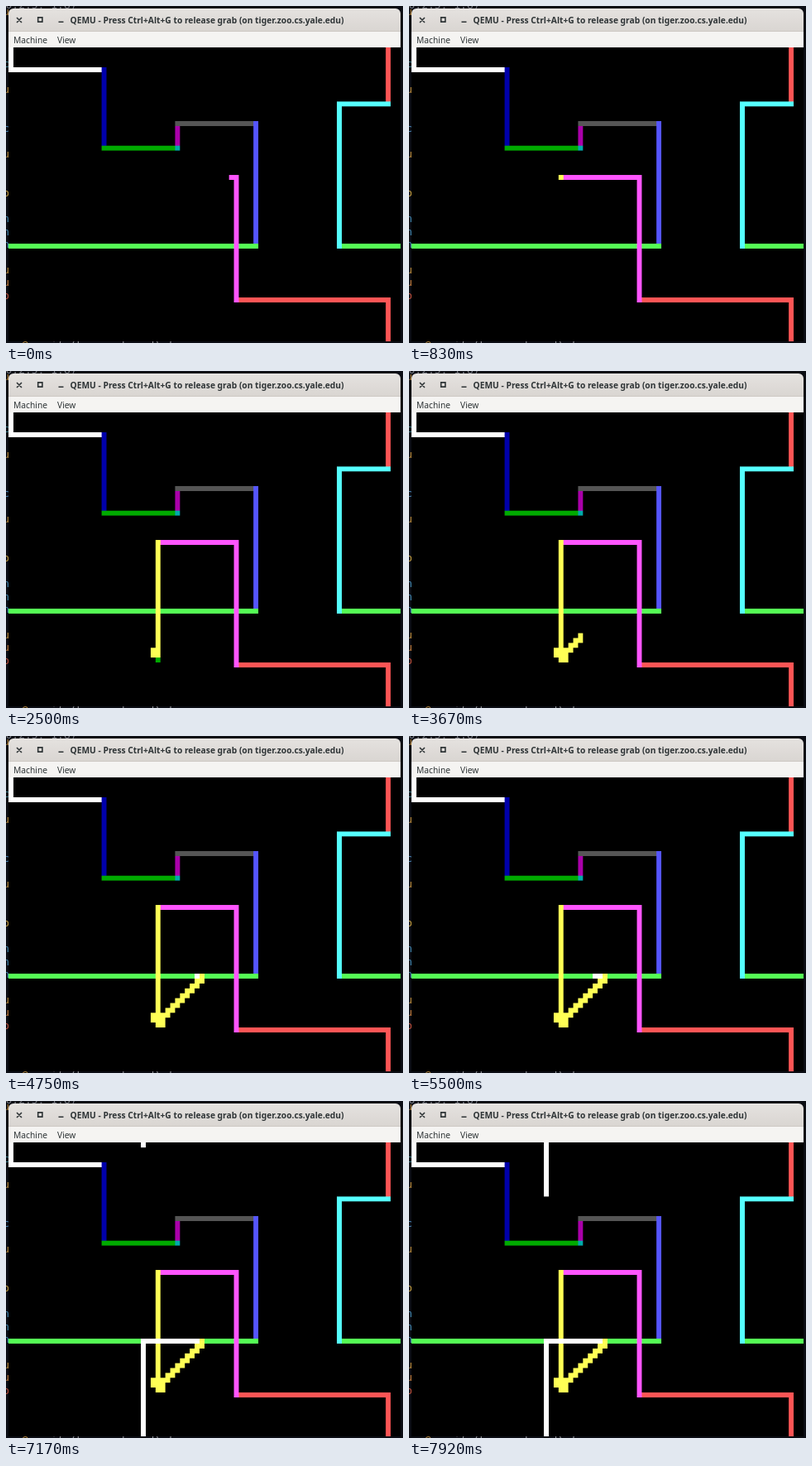
Recreate the animation shown at these times as an HTML page with a canvas. Size 480 by 407 pixels, loop 8 s.

```html
<!DOCTYPE html>
<html lang="en">
<head>
<meta charset="utf-8">
<title>Text-mode drawing</title>
<style>
  html, body { margin: 0; width: 100%; height: 100%; overflow: hidden; background: #0b0d14; }
  canvas { display: block; }
</style>
</head>
<body>
<canvas id="stage" width="480" height="407"></canvas>
<script>
const ctx = document.getElementById("stage").getContext("2d");
const LOOP = 8000, COLS = 80, ROWS = 60, CELL = 8;
const VIEW = { x: 3, y: 50.33, w: 474, h: 355 };
const STEP = { U: [0, -1], D: [0, 1], L: [-1, 0], R: [1, 0] };
const WHITE = "#fff", YELLOW = "#ff5", PINK = "#f5f", RED = "#f55", CYAN = "#5ff",
  LIME = "#5f5", GREEN = "#0a0", TEAL = "#0aa", PURPLE = "#a0a", GRAY = "#555",
  NAVY = "#00a", BLUE = "#55f";

// The emulated 640 x 480 screen, shown scaled down inside the window
const screen640 = document.createElement("canvas");
screen640.width = COLS * CELL;
screen640.height = ROWS * CELL;
const pen = screen640.getContext("2d");

const run = (dir, count) => dir.repeat(count);

// [start ms, ms per move, colour, moves]: the pen paints its cell at the start and after every move
const strokes = [
  [0, 0, WHITE, run("D", 4) + run("R", 19)],
  [0, 0, NAVY, run("D", 16)],
  [0, 0, GREEN, run("R", 15)],
  [0, 0, TEAL, "U"],
  [0, 0, PURPLE, run("U", 4)],
  [0, 0, GRAY, run("R", 16)],
  [0, 0, BLUE, run("D", 25)],
  [0, 0, LIME, run("L", 63)],
  [0, 0, CYAN, run("U", 29) + run("R", 10) + "U"],
  [0, 0, RED, run("U", 19) + run("L", 31)],
  [0, 0, PINK, run("U", 25) + "L"],
  [220, 30, PINK, run("L", 15)],
  [750, 150, YELLOW, "D"],
  [1400, 30, YELLOW, run("D", 21)],
  [2030, 80, YELLOW, "LDRD"],
  [2420, 0, GREEN, ""],
  [2700, 105, YELLOW, "RUURURURU"],
  [3670, 55, YELLOW, run("RU", 5)],
  [4300, 100, YELLOW, "L"],
  [4700, 400, WHITE, "L"],
  [5590, 30, WHITE, run("L", 10)],
  [6000, 100, WHITE, "D"],
  [6600, 30, WHITE, run("D", 29)],
];

function rect(color, x, y, w, h) {
  ctx.fillStyle = color;
  ctx.fillRect(x, y, w, h);
}

function text(str, x, y, font, color, align = "left") {
  ctx.font = font;
  ctx.fillStyle = color;
  ctx.textAlign = align;
  ctx.fillText(str, x, y);
}

function drawTerminal() {
  rect("#0b0d14", 0, 0, 480, 407);
  const font = '13px "DejaVu Sans Mono", monospace';
  const slivers = [
    ["u", 11, "#a97b35"], ["c", 74, "#3d8090"], ["u", 105, "#b98a3c"], ["c", 152, "#4a86b8"],
    ["u", 183, "#b98a3c"], ["o", 230, "#c8a040"], ["n", 261, "#4086b0"], ["n", 277, "#4086b0"],
    ["n", 292, "#4086b0"], ["u", 323, "#b98a3c"], ["u", 338, "#c07a3c"], ["o", 354, "#c0503c"],
  ];
  for (const [glyph, y, color] of slivers) text(glyph, 4, y, font, color, "right");
  text("u(40.2.5, 1.8)", -24, 3, font, "#77797f");
  text("@", 19, 414, font, "#b98a3c");
  text("if (keys = board) {", 54, 414, font, "#8d8f94");
}

function drawWindow() {
  ctx.save();
  ctx.beginPath();
  ctx.roundRect(VIEW.x, 3, VIEW.w, 404, [6, 6, 0, 0]);
  ctx.clip();
  const bar = ctx.createLinearGradient(0, 3, 0, 31);
  bar.addColorStop(0, "#e5e2df");
  bar.addColorStop(1, "#d9d5d1");
  rect(bar, 3, 3, 474, 28);
  rect("#cdc8c3", 3, 30, 474, 1);
  rect("#f5f4f2", 3, 31, 474, 20);
  ctx.restore();

  ctx.strokeStyle = "#2e3436";
  ctx.lineWidth = 1.6;
  ctx.beginPath();
  ctx.moveTo(13, 14); ctx.lineTo(19, 20);
  ctx.moveTo(19, 14); ctx.lineTo(13, 20);
  ctx.rect(38.7, 13.9, 5.2, 5.2);
  ctx.moveTo(63.5, 19.3); ctx.lineTo(69.5, 19.3);
  ctx.stroke();

  const family = '"Noto Sans", sans-serif';
  text("QEMU - Press Ctrl+Alt+G to release grab (on tiger.zoo.cs.yale.edu)",
    77.5, 20.5, `bold 10.25px ${family}`, "#2e3436");
  text("Machine", 9, 44.5, `10.25px ${family}`, "#2e3436");
  text("View", 62, 44.5, `10.25px ${family}`, "#2e3436");
}

function paintCell(col, row, color) {
  pen.fillStyle = color;
  pen.fillRect(col * CELL, row * CELL, CELL, CELL);
}

function drawTrail(time) {
  let col = 0, row = 0;
  for (const [start, gap, color, moves] of strokes) {
    if (time < start) return;
    paintCell(col, row, color);
    for (let i = 0; i < moves.length; i++) {
      if (time < start + (i + 1) * gap) return;
      const [dx, dy] = STEP[moves[i]];
      col = (col + dx + COLS) % COLS;
      row = (row + dy + ROWS) % ROWS;
      paintCell(col, row, color);
    }
  }
}

function drawScreen(time) {
  pen.fillStyle = "#000";
  pen.fillRect(0, 0, screen640.width, screen640.height);
  drawTrail(time);
  ctx.imageSmoothingQuality = "high";
  ctx.drawImage(screen640, VIEW.x, VIEW.y, VIEW.w, VIEW.h);
}

let origin;
function frame(now) {
  origin ??= now;
  drawTerminal();
  drawWindow();
  drawScreen((now - origin) % LOOP);
  requestAnimationFrame(frame);
}
requestAnimationFrame(frame);
</script>
</body>
</html>
```
